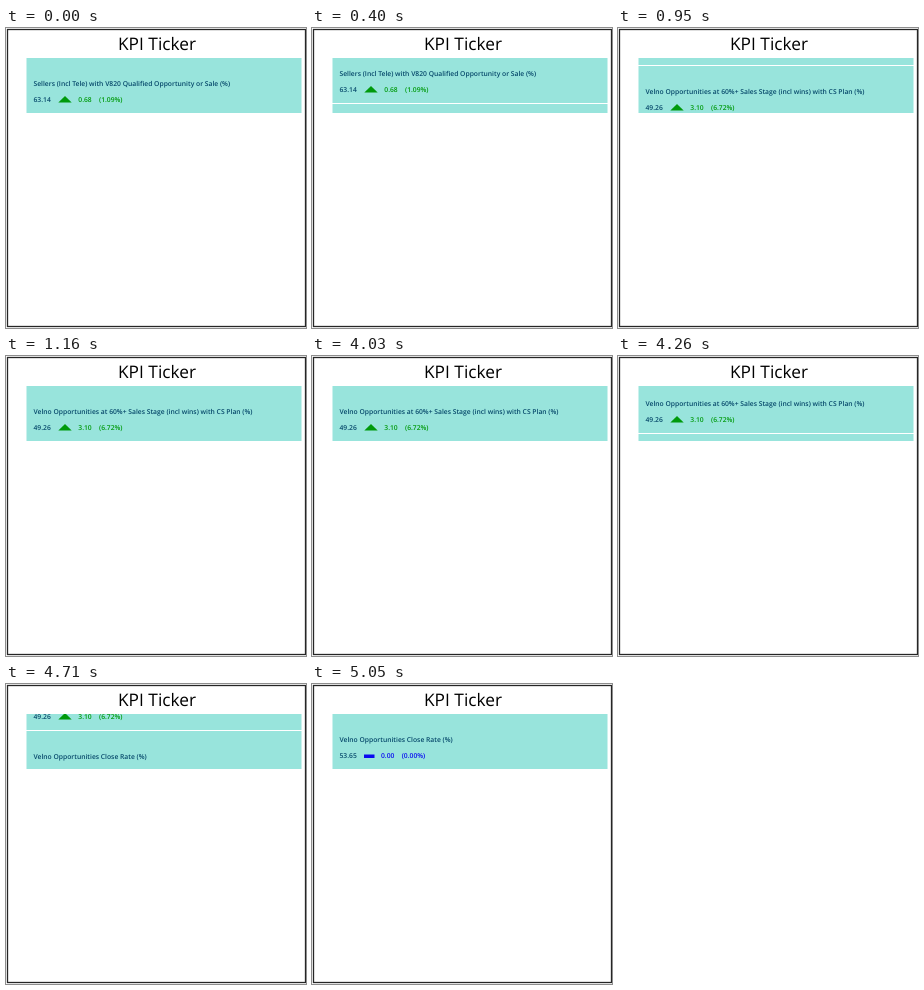
These frames come from a looping animation (300x300 px, 6.03 s). An HTML page:

```html
<!DOCTYPE html>
<html lang="en">
<head>
<meta charset="utf-8">
<title>KPI Ticker</title>
<style>
  html, body { margin: 0; width: 100%; height: 100%; overflow: hidden; background: #fff; }
  svg { display: block; width: 100vw; height: 100vh; }
  text { font-family: "Open Sans", "Noto Sans", sans-serif; text-rendering: geometricPrecision; }
  .heading { font-size: 17.3px; fill: #000; text-anchor: middle; }
  .item text { font-size: 6.75px; font-weight: 600; fill: #07496b; }
  .item .up { fill: #009a0c; }
  .item .flat { fill: #0a0af0; }
</style>
</head>
<body>
<svg viewBox="0 0 300 300" xmlns="http://www.w3.org/2000/svg">
  <clipPath id="window"><rect x="20.5" y="30" width="275" height="55"/></clipPath>
  <rect x="1.5" y="1.5" width="298" height="297" fill="#fff" stroke="#262626" stroke-width="1.3"/>
  <text class="heading" x="151" y="22">KPI Ticker</text>
  <g clip-path="url(#window)"><g id="strip"></g></g>
</svg>
<script>
const LOOP = 6030;
const PANEL = 55;
const PITCH = PANEL + 1;
const SLIDE = 1160;

// Each slide eases over SLIDE ms; it is visible only between from and to.
const slides = [
  { start: 78, from: 140, to: 1160 },
  { start: 3976, from: 4030, to: 5050 }
];

const items = [
  { title: 'Sellers (Incl Tele) with V820 Qualified Opportunity or Sale (%)',
    value: '63.14', delta: '0.68', percent: '(1.09%)', trend: 'up' },
  { title: 'Velno Opportunities at 60%+ Sales Stage (incl wins) with CS Plan (%)',
    value: '49.26', delta: '3.10', percent: '(6.72%)', trend: 'up' },
  { title: 'Velno Opportunities Close Rate (%)',
    value: '53.65', delta: '0.00', percent: '(0.00%)', trend: 'flat' }
];

const icons = {
  up: { shape: '<path class="up" d="M52.3 74.6 L59 68 L65.7 74.6Z"/>', next: 72.3 },
  flat: { shape: '<rect class="flat" x="52" y="70.5" width="10.5" height="3.5"/>', next: 69 }
};

function itemMarkup({ title, value, delta, percent, trend }, index) {
  const { shape, next } = icons[trend];
  return `<g class="item" transform="translate(0 ${index * PITCH})">
    <rect x="20" y="30" width="276" height="${PANEL}" fill="#98e4dc"/>
    <text x="27.5" y="58.3">${title}</text>
    <text x="27.5" y="74.2">${value}</text>
    ${shape}
    <text class="${trend}" x="${next}" y="74.2">${delta}</text>
    <text class="${trend}" x="${next + 20.7}" y="74.2">${percent}</text>
  </g>`;
}

const strip = document.getElementById('strip');
strip.innerHTML = items.map(itemMarkup).join('');

function progress(time, { start, from, to }) {
  if (time < from) return 0;
  if (time >= to) return 1;
  return (1 - Math.cos(Math.PI * (time - start) / SLIDE)) / 2;
}

function draw(time) {
  const shift = slides.reduce((sum, slide) => sum + Math.round(PITCH * progress(time, slide)), 0);
  strip.setAttribute('transform', `translate(0 ${-shift})`);
}

const origin = performance.now();
function tick() {
  draw((performance.now() - origin) % LOOP);
  requestAnimationFrame(tick);
}
tick();
</script>
</body>
</html>
```
